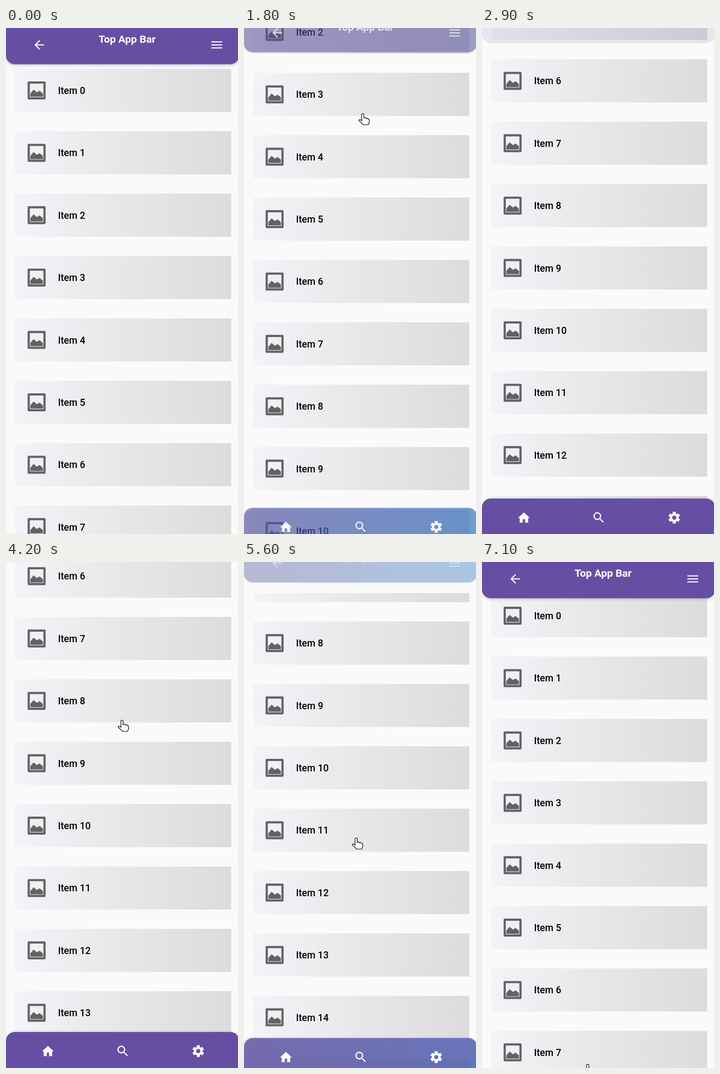
Write an HTML page with a canvas that moves like this. It is 426 px wide and 928 px high and loops after 7200 ms.

```html
<!DOCTYPE html>
<html>
<head>
<meta charset="utf-8">
<title>Collapsing app bars</title>
<style>
html, body { margin: 0; width: 100%; height: 100%; overflow: hidden; background: #fafafa; }
canvas { display: block; }
</style>
</head>
<body>
<canvas id="stage" width="426" height="928"></canvas>
<script>
const ctx = document.getElementById('stage').getContext('2d');
const LOOP = 7200, STEP = 100, PITCH = 114.4;
const PURPLE = [102, 79, 163], BLUE = [36, 136, 226];

// Each track is a list of [time, value, ...]
const scrollTrack = [[600, 0], [1800, 336], [2100, 500], [2400, 610], [2900, 704], [3400, 765], [3700, 775],
  [4300, 775], [4850, 1050], [5100, 1100], [5600, 881], [6400, 516], [6700, 290], [6900, 120], [7100, 16]];
const shiftTrack = [[800, 0], [1800, 22], [2900, 39], [3200, 43], [4850, 43], [5600, 29], [6400, 16], [7000, 0]];
const topBlueTrack = [[800, 0], [1800, .15], [2900, .1], [4850, 1], [6400, 1], [7000, 0]];
const bottomBlueTrack = [[800, 1], [1800, .8], [2900, 0], [4850, 0], [5600, .35], [6400, .9]];
const cursorTrack = [[300, 225, 940], [600, 222, 495], [1800, 218, 157], [2300, 216, -30], [3400, 216, -30],
  [4000, 213, 290], [4200, 213, 290], [4400, 212, 380], [4850, 209, 180], [5100, 208, 287],
  [5600, 206, 506], [6400, 228, 861], [7100, 194, 921]];

const icons = {
  back: new Path2D('M20 11H7.8l5.6-5.6L12 4l-8 8 8 8 1.4-1.4L7.8 13H20z'),
  menu: new Path2D('M3 18h18v-2H3zm0-5h18v-2H3zm0-7v2h18V6z'),
  home: new Path2D('M10 20v-6h4v6h5v-8h3L12 3 2 12h3v8z'),
  search: new Path2D('M14.2 14.2L19.7 19.7M15 9.5A5.5 5.5 0 1 1 4 9.5A5.5 5.5 0 1 1 15 9.5z'),
  gear: gearPath()
};
const hand = new Path2D('M0 2C0-.6 4-.6 4 2V8C6 7 8 7.500 8 9C10 8 11.500 8.500 11.500 10' +
  'C13.500 9.500 14 10.500 14 12V16L12 20.500H3L-5 13C-5.500 10.500-2.500 10.500 0 13z');

function gearPath() {
  const path = new Path2D();
  for (let i = 0; i < 6; i++) {
    for (const [radius, offset] of [[7.2, -.38], [10, -.25], [10, .25], [7.2, .38]]) {
      const angle = (i + .5) * Math.PI / 3 + offset;
      path.lineTo(12 + radius * Math.cos(angle), 12 + radius * Math.sin(angle));
    }
  }
  path.closePath();
  path.moveTo(15.5, 12);
  path.arc(12, 12, 3.5, 0, 7);
  return path;
}

function sample(track, t, column = 1) {
  const next = track.findIndex(key => key[0] > t);
  if (next === 0) return track[0][column];
  if (next < 0) return track[track.length - 1][column];
  const a = track[next - 1], b = track[next];
  return a[column] + (b[column] - a[column]) * (t - a[0]) / (b[0] - a[0]);
}

function mix(amount) {
  return `rgb(${PURPLE.map((v, i) => Math.round(v + (BLUE[i] - v) * amount))})`;
}

function horizontal(x0, x1, ...colors) {
  const gradient = ctx.createLinearGradient(x0, 0, x1, 0);
  colors.forEach((color, i) => gradient.addColorStop(i / (colors.length - 1), color));
  return gradient;
}

function text(label, x, baseline, font, color) {
  ctx.font = font + ' Roboto, sans-serif';
  ctx.fillStyle = color;
  ctx.fillText(label, x, baseline);
}

function icon(name, x, y) {
  ctx.save();
  ctx.translate(x, y);
  ctx.scale(1.1, 1.1);
  ctx.translate(-12, -12);
  ctx.fillStyle = ctx.strokeStyle = '#fff';
  ctx.lineWidth = 2;
  if (name === 'search') ctx.stroke(icons.search);
  else ctx.fill(icons[name], 'evenodd');
  ctx.restore();
}

function picture(x, y) {
  ctx.fillStyle = '#626265';
  ctx.beginPath();
  ctx.roundRect(x, y, 33, 33, 2);
  ctx.fill();
  ctx.fillStyle = '#f0f0f3';
  ctx.fillRect(x + 4, y + 4, 25, 25);
  ctx.fillStyle = '#626265';
  ctx.beginPath();
  for (const [px, py] of [[5, 22], [11, 15], [17, 20], [22, 17], [28, 22], [28, 28], [5, 28]]) ctx.lineTo(x + px, y + py);
  ctx.fill();
}

function drawList(scroll, clipTop) {
  ctx.save();
  ctx.beginPath();
  ctx.rect(0, clipTop, 426, 928);
  ctx.clip();
  for (let i = 0; i < 20; i++) {
    const y = 75 + i * PITCH - scroll;
    if (y < -80 || y > 928) continue;
    ctx.fillStyle = horizontal(16, 413, '#f3f4f8', '#e7e7e9', '#dcdcdc');
    ctx.fillRect(16.5, y, 397, 79);
    picture(39.7, y + 23);
    text('Item ' + i, 95.500, y + 46, '500 17.6px', '#000');
  }
  ctx.restore();
}

function barShape(y, corners, alpha, blue) {
  ctx.globalAlpha = alpha;
  ctx.shadowColor = 'rgba(0,0,0,.25)';
  ctx.shadowBlur = 6 * alpha;
  ctx.shadowOffsetY = 1;
  ctx.fillStyle = horizontal(0, 428, mix(blue * .2), mix(blue * .9));
  ctx.beginPath();
  ctx.roundRect(0, y, 428, 66.5, corners);
  ctx.fill();
  ctx.shadowColor = 'transparent';
  ctx.globalAlpha = Math.min(1, alpha * 1.5);
}

function drawTopBar(shift, blue) {
  if (shift >= 43) return;
  barShape(-shift, [0, 0, 16, 16], 1 - shift / 43, blue);
  text('Top App Bar', 170, 27 - shift, '700 19.2px', '#fff');
  icon('back', 61, 31 - shift);
  icon('menu', 387, 31 - shift);
  ctx.globalAlpha = 1;
}

function drawBottomBar(shift, blue) {
  if (shift <= 0) return;
  const y = 862 + Math.max(0, 40 - shift);
  barShape(y, [16, 16, 0, 0], Math.min(1, shift / 36), blue);
  icon('home', 77, y + 35.500);
  icon('search', 214.500, y + 35);
  icon('gear', 353, y + 35);
  ctx.globalAlpha = 1;
}

function drawCursor(x, y) {
  ctx.save();
  ctx.translate(x - 2, y);
  ctx.fillStyle = '#fff';
  ctx.strokeStyle = '#111';
  ctx.lineWidth = 1.2;
  ctx.fill(hand);
  ctx.stroke(hand);
  ctx.restore();
}

function draw(now) {
  const t = Math.floor(now % LOOP / STEP) * STEP;
  const shift = sample(shiftTrack, t);
  ctx.fillStyle = '#fafafa';
  ctx.fillRect(0, 0, 426, 928);
  drawList(sample(scrollTrack, t), t >= 5000 ? 57 : 0);
  drawTopBar(shift, sample(topBlueTrack, t));
  drawBottomBar(shift, sample(bottomBlueTrack, t));
  drawCursor(sample(cursorTrack, t), sample(cursorTrack, t, 2));
}

let start;
function tick(now) {
  start ??= now;
  draw(now - start);
  requestAnimationFrame(tick);
}
draw(0);
requestAnimationFrame(tick);
</script>
</body>
</html>
```
